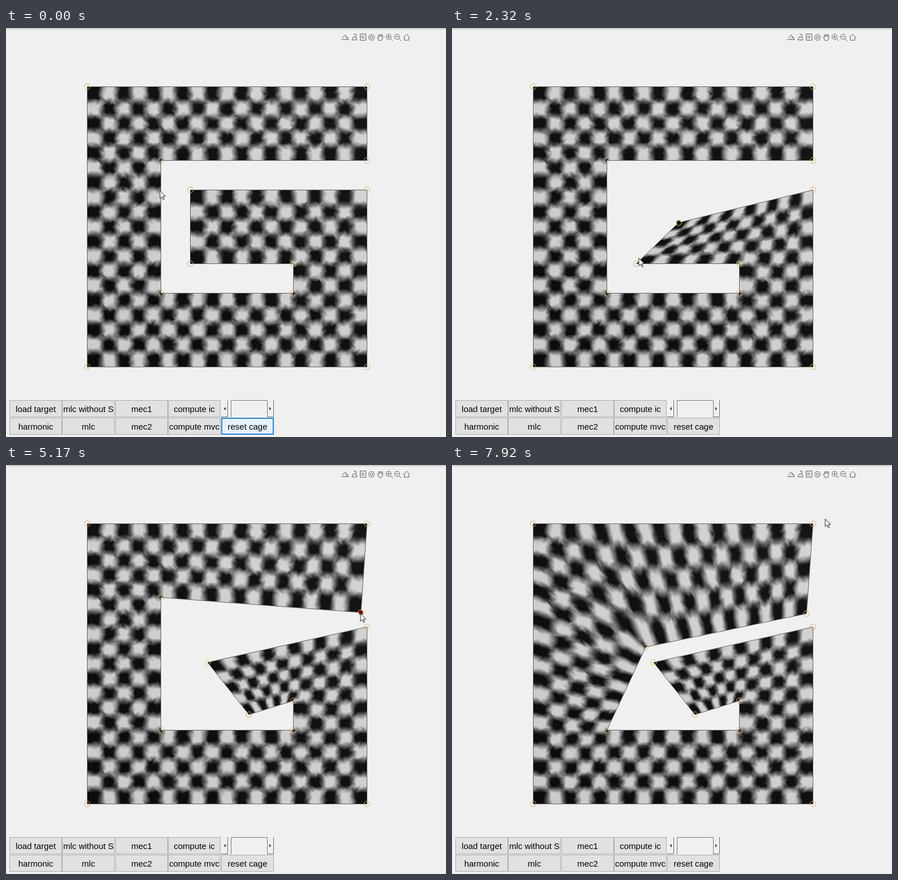
Write an HTML page with a canvas that moves like this. It is 777 px wide and 721 px high and loops after 8 s.

```html
<!DOCTYPE html>
<html lang="en">
<head>
<meta charset="utf-8">
<title>Cage deformation</title>
<style>
html, body { margin: 0; width: 100%; height: 100%; overflow: hidden; background: #f0f0f0; }
canvas, svg { position: absolute; left: 0; top: 0; }
#ui div {
  position: absolute; box-sizing: border-box; width: 93px; height: 30px;
  border: 1px solid #adadad; background: #e1e1e1; color: #000;
  font: 15px/30px "Liberation Sans", Arial, sans-serif; text-align: center; white-space: nowrap;
}
#ui div.focus { border: 2px solid #2b83d3; background: #e5f1fb; line-height: 28px; }
</style>
</head>
<body>
<canvas id="stage" width="777" height="721"></canvas>
<div id="ui"></div>
<svg width="777" height="721" fill="none" stroke="#5a5a5a">
  <path d="M0 1.5H777" stroke="#a8a8a8"/>
  <!-- toolbar -->
  <path d="M592 20.5H605L599 12L594 18M599 17H604"/>
  <path d="M614 11H618V16L620 21H611L613 16H618"/>
  <path d="M625.5 10.5H635.5V21.5H625.5ZM627 14.5H633M627 17.5H633"/>
  <circle cx="645.5" cy="16.5" r="5"/><circle cx="645.5" cy="16.5" r="2"/>
  <path d="M658 21L656 16H658V12H665V19L663 22H659ZM660 12V16M663 12V16"/>
  <path id="lens" d="M679 19L683 23M673 15.5H678M680 15.5A4.5 4.5 0 1 0 671 15.5A4.5 4.5 0 1 0 680 15.5"/>
  <use href="#lens" x="15"/><path d="M675.5 13V18"/>
  <path d="M702 16.5L707.5 11L713 16.5M703.5 16V21.5H711.5V16"/>
  <!-- slider -->
  <path d="M391.5 656V685.5H380M472.5 656V685.5H461" stroke="#696969"/>
  <path d="M397.5 686V656.5H461.5V686" stroke="#777"/>
  <path d="M388 668V674L384.5 671ZM465 668V674L468.500 671Z" fill="#444" stroke="none"/>
</svg>
<script>
const LOOP = 8000, STEP = 110, SUB = 4, N = 19 * SUB, S = N + 1;
const CELL = 26, OX = 143.5, OY = 103.5, W = 777, H = 650;
const ctx = document.getElementById('stage').getContext('2d');

const buttons = [
  ['load target', 'mlc without S', 'mec1', 'compute ic'],
  ['harmonic', 'mlc', 'mec2', 'compute mvc', 'reset cage']];
let reset;
buttons.forEach((row, r) => row.forEach((label, c) => {
  reset = document.createElement('div');
  reset.textContent = label;
  reset.style.left = Math.floor(6 + c * 93.5) + 'px';
  reset.style.top = 656 + r * 31 + 'px';
  document.getElementById('ui').append(reset);
}));

// Cage corners in checker cells: x and y change in turn
const turns = [0, 0, 19, 5, 5, 14, 14, 12, 7, 7, 19, 19, 0];
const cage = turns.slice(1).map((v, k) => k % 2 ? [v, turns[k]] : [turns[k], v]);
const toStage = ([x, y]) => [OX + x * CELL, OY + y * CELL];

// The mesh stalls at the share `hold` of a drag and catches up at the next press
const drags = [
  { corner: 8, arrive: 530, press: 750, release: 2090, leave: 2090, hold: .6, via: [[419, 341], [356, 348]] },
  { corner: 7, arrive: 2380, press: 2850, release: 3410, leave: 3410, hold: .9, via: [[429, 440]] },
  { corner: 2, arrive: 4290, press: 4730, release: 5170, leave: 5280, hold: .84, via: [[626, 262]] },
  { corner: 3, arrive: 5830, press: 6050, release: 7040, leave: 7260, hold: .7, via: [[342, 321]] }];
drags.forEach((d, i) => {
  d.path = [toStage(cage[d.corner]), ...d.via];
  d.flush = i < 3 ? drags[i + 1].press : d.release;
});
// The last drag reaches its goal before the button goes up
drags[3].reach = 6820;

const clamp = v => Math.max(0, Math.min(1, v));
const ease = f => f * f * (3 - 2 * f);
const mix = (a, b, f) => [a[0] + (b[0] - a[0]) * f, a[1] + (b[1] - a[1]) * f];
const progress = (d, t) => clamp((t - d.press) / ((d.reach || d.release) - d.press));

function along(path, f) {
  const s = ease(f) * (path.length - 1), i = Math.min(s | 0, path.length - 2);
  return mix(path[i], path[i + 1], s - i);
}

function handleAt(d, t) {
  const f = progress(d, t);
  return along(d.path, t < d.flush ? Math.min(f, Math.max(d.hold, .86 * (d.reach ? 1 : 0))) : f);
}

function mouseAt(t) {
  let from = [272, 287], leave = 70;
  for (const d of drags) {
    if (t < d.press) return mix(from, d.path[0], ease(clamp((t - leave) / (d.arrive - leave))));
    if (t < d.leave) return along(d.path, progress(d, t));
    from = d.path[d.path.length - 1];
    leave = d.leave;
  }
  return mix(from, [659, 95], ease(clamp((t - leave) / (7900 - leave))));
}

let seed = 7;
function rnd() {
  seed = (seed * 1664525 + 1013904223) >>> 0;
  return seed / 4294967296;
}

function inside(i, j) {
  if (i < 0 || j < 0 || i >= N || j >= N) return 0;
  const x = i / SUB | 0, y = j / SUB | 0;
  return +!(x >= 5 && y >= 5 && y < 14 && (y < 7 || x < 7 || (y >= 12 && x < 14)));
}
const around = (i, j) => [inside(i - 1, j - 1), inside(i, j - 1), inside(i - 1, j), inside(i, j)];

// Linear along the two cage edges that meet in corner k, zero on the others
function hat(k, x, y) {
  const p = cage[k].map(v => v * SUB);
  for (const d of [1, 11]) {
    const q = cage[(k + d) % 12].map(v => v * SUB);
    const len = Math.abs(q[0] - p[0]) + Math.abs(q[1] - p[1]);
    const a = Math.abs(x - p[0]) + Math.abs(y - p[1]);
    if (a + Math.abs(x - q[0]) + Math.abs(y - q[1]) === len) return 1 - a / len;
  }
  return 0;
}

// Harmonic weight of one cage corner on the lattice
function solve(k) {
  const w = new Float64Array(S * S), free = [];
  for (let j = 0; j <= N; j++) for (let i = 0; i <= N; i++) {
    const sum = around(i, j).reduce((a, b) => a + b);
    if (sum === 4) free.push(j * S + i);
    else if (sum) w[j * S + i] = hat(k, i, j);
  }
  for (let n = 0; n < 250; n++)
    for (const c of free) w[c] += 1.88 * ((w[c - 1] + w[c + 1] + w[c - S] + w[c + S]) / 4 - w[c]);
  return w;
}

function sample(w, x, y) {
  const i = Math.min(x | 0, N - 1), j = Math.min(y | 0, N - 1), f = x - i, g = y - j, c = j * S + i;
  return (w[c] * (1 - f) + w[c + 1] * f) * (1 - g) + (w[c + S] * (1 - f) + w[c + S + 1] * f) * g;
}

// Soft checker, dark in the first cell
function checker(x, y) {
  const s = Math.sin(Math.PI * x / SUB) * Math.sin(Math.PI * y / SUB);
  return clamp(.5 - 1.7 * s);
}

const fields = drags.map(d => solve(d.corner));
const verts = [], tris = [];
for (let j = 0; j <= N; j++) for (let i = 0; i <= N; i++) {
  const [a, b, c, d] = around(i, j);
  const jx = (rnd() - .5) * .7, jy = (rnd() - .5) * .7;
  const x = i + (a === b && c === d ? jx : 0), y = j + (a === c && b === d ? jy : 0);
  const inX = (b + d - a - c) * SUB / 4, inY = (c + d - a - b) * SUB / 4;
  const lit = (x - y) / N, [X, Y] = toStage([x / SUB, y / SUB]);
  verts.push({
    x: X, y: Y,
    v: 16 + 5 * lit + 191 * checker(x + inX, y + inY),
    w: a + b + c + d ? fields.map(f => sample(f, x, y)) : [0, 0, 0, 0]
  });
  if (d) {
    const p = j * S + i, q = p + S;
    tris.push(...rnd() < .5 ? [[p, p + 1, q], [p + 1, q + 1, q]] : [[p, p + 1, q + 1], [p, q + 1, q]]);
  }
}

const image = ctx.createImageData(W, H);
const px = new Uint32Array(image.data.buffer);

function shade(a, b, c) {
  const area = (b.X - a.X) * (c.Y - a.Y) - (c.X - a.X) * (b.Y - a.Y);
  if (Math.abs(area) < 1e-6) return;
  const x0 = Math.ceil(Math.min(a.X, b.X, c.X) - .5), x1 = Math.max(a.X, b.X, c.X) - .5;
  const y0 = Math.ceil(Math.min(a.Y, b.Y, c.Y) - .5), y1 = Math.max(a.Y, b.Y, c.Y) - .5;
  for (let y = y0; y <= y1; y++) for (let x = x0; x <= x1; x++) {
    const dx = x + .5 - a.X, dy = y + .5 - a.Y;
    const s = (dx * (c.Y - a.Y) - (c.X - a.X) * dy) / area;
    const t = ((b.X - a.X) * dy - dx * (b.Y - a.Y)) / area;
    if (s > -1e-6 && t > -1e-6 && s + t < 1.000001)
      px[y * W + x] = 0xff000000 | Math.round(a.v + s * (b.v - a.v) + t * (c.v - a.v)) * 0x10101;
  }
}

function renderMesh(moves) {
  px.fill(0xfff0f0f0);
  for (const p of verts) {
    p.X = p.x;
    p.Y = p.y;
    moves.forEach(([dx, dy], k) => { p.X += p.w[k] * dx; p.Y += p.w[k] * dy; });
  }
  for (const [a, b, c] of tris) shade(verts[a], verts[b], verts[c]);
}

function disc(x, y, r, fill, stroke) {
  ctx.beginPath();
  ctx.arc(x, y, r, 0, 7);
  if (fill) { ctx.fillStyle = fill; ctx.fill(); }
  if (stroke) { ctx.strokeStyle = stroke; ctx.stroke(); }
}

const arrow = new Path2D('M0 0V13.5L3.2 10.6L5.4 15.6L7.5 14.7L5.3 9.8H9.6Z');
let last = '';

function draw(t) {
  const pts = cage.map(toStage);
  const moves = drags.map(d => {
    const p = handleAt(d, t), [x, y] = pts[d.corner];
    pts[d.corner] = p;
    return [p[0] - x, p[1] - y];
  });
  if (last !== (last = moves.join())) renderMesh(moves);
  ctx.putImageData(image, 0, 0);

  ctx.lineWidth = 1;
  ctx.strokeStyle = '#606060';
  ctx.beginPath();
  pts.forEach(p => ctx.lineTo(...p));
  ctx.closePath();
  ctx.stroke();
  pts.forEach((p, i) => {
    const d = drags.find(d => d.corner === i), first = d === drags[0];
    if (d && t >= d.press && t < d.flush) disc(...p, 3.6, first ? '#111' : '#700a08');
    disc(...p, 5, null, first && t >= d.press ? '#e6d545' : '#d9ae60');
  });

  const [mx, my] = mouseAt(t);
  if (drags.some(d => t >= d.press && t < d.release)) disc(mx, my, 9, 'rgba(255,232,30,.72)');
  ctx.save();
  ctx.translate(mx, my);
  ctx.fillStyle = '#fff';
  ctx.strokeStyle = '#222';
  ctx.fill(arrow);
  ctx.stroke(arrow);
  ctx.restore();
  reset.className = t < drags[0].press ? 'focus' : '';
}

function frame() {
  const t = performance.now() % LOOP;
  draw(STEP * Math.floor((t + 10) / STEP));
  requestAnimationFrame(frame);
}
frame();
</script>
</body>
</html>
```
